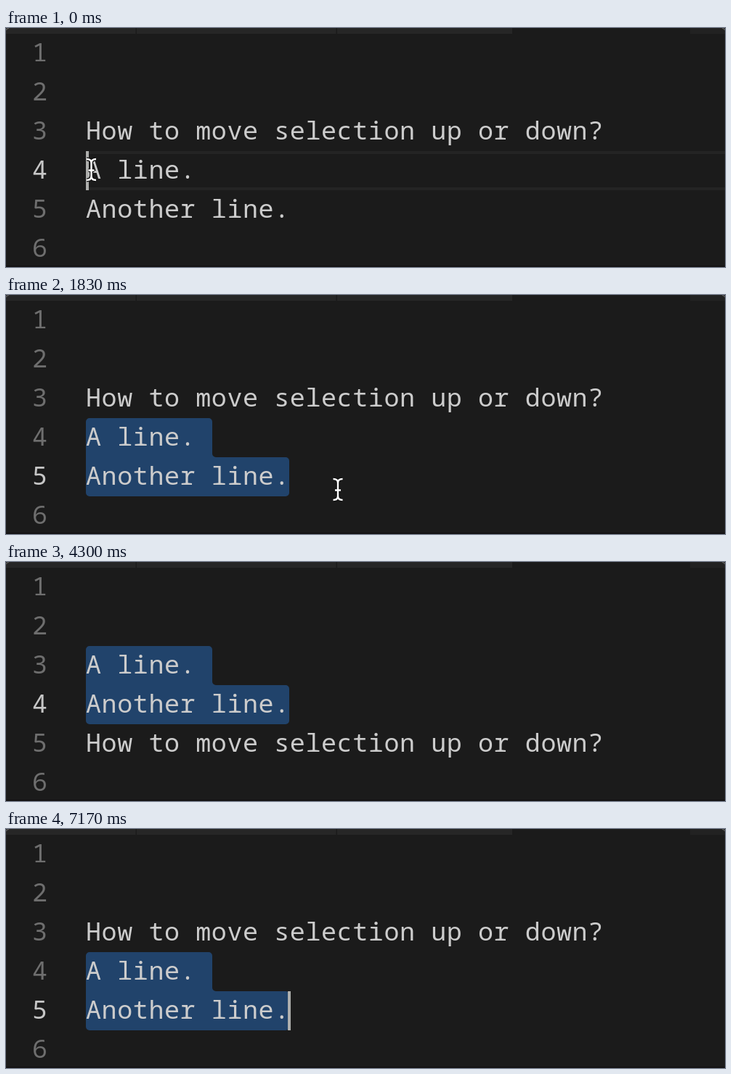
Recreate the animation shown at these times as an HTML page with a canvas. Size 990 by 330 pixels, loop 7.43 s.

```html
<!DOCTYPE html>
<html lang="en">
<head>
<meta charset="utf-8">
<title>Move selection up or down</title>
<style>
  html, body { margin: 0; width: 100%; height: 100%; overflow: hidden; background: #1b1b1b; }
  canvas { display: block; }
</style>
</head>
<body>
<canvas id="stage" width="990" height="330"></canvas>
<script>
const ctx = document.getElementById('stage').getContext('2d');
const LOOP = 7430, LEFT = 110, ROW = 54, CELL = 278 / 13;
const DRAG = [100, 480], MOUSE_GONE = 2800, MOVE_UP = 2830, MOVE_DOWN = 5130;
const QUESTION = 'How to move selection up or down?';
const LINES = ['A line.', 'Another line.'];

const rowTop = n => 8 + ROW * (n - 1);
const clamp = (v, lo, hi) => Math.min(hi, Math.max(lo, v));
const progress = (t, from, to) => clamp((t - from) / (to - from), 0, 1);
const smooth = p => p * p * (3 - 2 * p);

function rect(color, x, y, w, h) {
  ctx.fillStyle = color;
  ctx.fillRect(x, y, w, h);
}

function text(str, x, row, color) {
  ctx.fillStyle = color;
  ctx.fillText(str, x, rowTop(row) + 38);
}

function drawWindow() {
  rect('#1b1b1b', 0, 0, 990, 330);
  rect('#262626', 0, 0, 697, 8);
  rect('#222222', 942, 0, 48, 8);
  for (const x of [178.5, 454.5]) rect('#1b1b1b', x, 0, 1.5, 8);
  rect('#141314', 0, 328, 990, 2);
  ctx.strokeStyle = '#555';
  ctx.lineWidth = 1.5;
  ctx.stroke(new Path2D('M0 3 Q1 1 4 0 M990 3 Q989 1 986 0'));
}

function drawSelection(firstRow, lastRow, endX) {
  const top = rowTop(firstRow), mid = top + ROW;
  const twoRows = lastRow > firstRow;
  const right = twoRows ? 284 : endX;
  const points = [[LEFT, top], [right, top], [right, mid]];
  if (twoRows) points.push([endX, mid], [endX, mid + ROW], [LEFT, mid + ROW]);
  else points.push([LEFT, mid]);
  const stepRadius = twoRows ? Math.min(5, Math.abs(endX - right) / 2) : 5;
  ctx.beginPath();
  ctx.moveTo(LEFT, top + 10);
  points.forEach(([x, y], i) => {
    const [nextX, nextY] = points[(i + 1) % points.length];
    ctx.arcTo(x, y, nextX, nextY, i === 2 || i === 3 ? stepRadius : 5);
  });
  ctx.closePath();
  ctx.fillStyle = '#21436b';
  ctx.fill();
}

function drawMouse(x, y) {
  const beam = new Path2D('M-6.5 -14.5 Q0 -14.5 0 -9 V9 Q0 14.5 -6.5 14.5' +
    'M6.5 -14.5 Q0 -14.5 0 -9 M0 9 Q0 14.5 6.5 14.5 M-4 1 H4');
  ctx.save();
  ctx.translate(x, y);
  for (const [color, width] of [['#111', 5], ['#fff', 2.4]]) {
    ctx.strokeStyle = color;
    ctx.lineWidth = width;
    ctx.stroke(beam);
  }
  ctx.restore();
}

function drawKeys(up, alpha) {
  ctx.save();
  ctx.globalAlpha = alpha;
  ctx.fillStyle = '#393939';
  ctx.beginPath();
  ctx.roundRect(100, 20, 127, 90, 32);
  ctx.fill();
  ctx.shadowColor = 'rgba(0,0,0,.5)';
  ctx.shadowBlur = 3;
  ctx.shadowOffsetY = 2;
  ctx.strokeStyle = ctx.fillStyle = '#9b9b9b';
  ctx.lineWidth = 5;
  ctx.stroke(new Path2D('M124.5 49 H138.5 L154 84 H168 M148.5 49 H168'));
  ctx.translate(188, 65);
  if (!up) ctx.scale(1, -1);
  ctx.fill(new Path2D('M0 -22 L12 -10 H-12 Z'));
  for (let i = 0; i < 5; i++) ctx.fillRect(-2.25, -10 + i * 6.8, 4.5, 4.2);
  ctx.restore();
}

function draw(t) {
  const drag = smooth(progress(t, ...DRAG));
  const mouse = { x: 117.5 + 339.5 * drag, y: 195.5 + 73 * drag };
  const moved = t >= MOVE_UP && t < MOVE_DOWN;
  const firstRow = moved ? 3 : 4;
  const caretRow = moved ? 4 : mouse.y < rowTop(5) ? 4 : 5;
  const maxCol = LINES[caretRow - firstRow].length;
  const col = drag ? clamp(Math.round((mouse.x - LEFT) / CELL), 0, maxCol) : 0;
  const caretX = Math.round(LEFT + CELL * col);

  drawWindow();
  if (col) drawSelection(firstRow, caretRow, caretX + 2);
  else for (const y of [170, 220]) rect('#242424', LEFT, y, 880, 4);

  ctx.font = '35px "Noto Sans Mono", monospace';
  ctx.letterSpacing = '0.6px';
  for (let n = 1; n <= 6; n++) text(n, 36, n, n === caretRow ? '#c6c6c6' : '#6e6e6e');
  text(QUESTION, LEFT, moved ? 5 : 3, '#cccccc');
  LINES.forEach((line, i) => text(line, LEFT, firstRow + i, '#cccccc'));

  // The caret restarts its 500 ms blink after the drag and every move.
  const blinkStart = t >= MOVE_DOWN ? MOVE_DOWN + 35 : t >= MOVE_UP ? MOVE_UP - 32 : 330;
  if (Math.floor(Math.max(0, t - blinkStart) / 500) % 2 === 0)
    rect('#aeafad', caretX, rowTop(caretRow), 4, ROW);

  if (t >= MOVE_UP && t < 3920) drawKeys(true, 1 - progress(t, 3700, 3920));
  if (t >= MOVE_DOWN && t < 6240) drawKeys(false, 1 - progress(t, 6060, 6240));
  if (t < MOUSE_GONE) drawMouse(mouse.x, mouse.y);
}

function tick() {
  draw(performance.now() % LOOP);
  requestAnimationFrame(tick);
}
tick();
</script>
</body>
</html>
```
